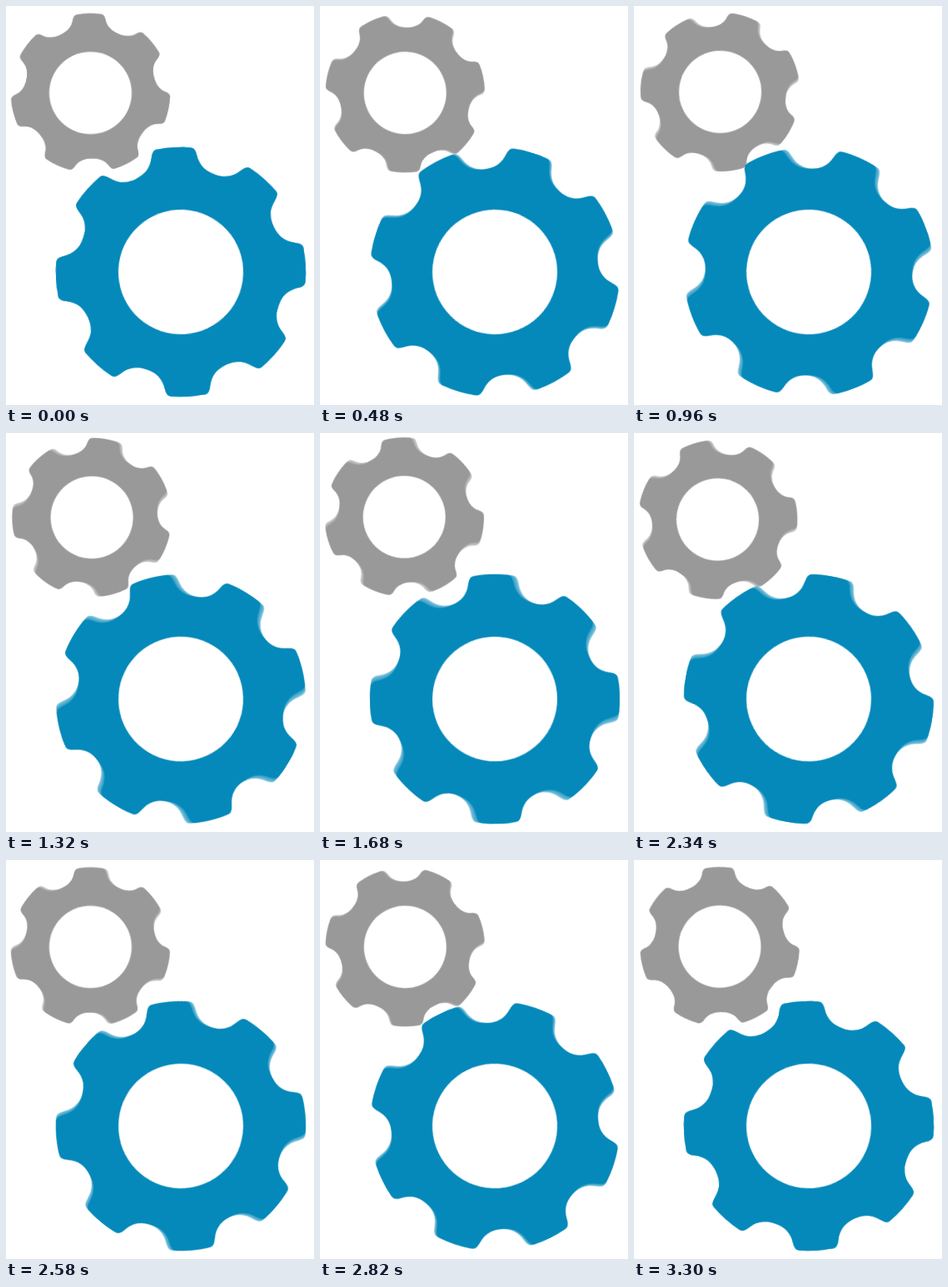
Recreate the animation shown at these times as an HTML page without scripts. Size 370 px wide and 480 px high, loop 3.33 s.

```html
<!DOCTYPE html>
<html lang="en">
<head>
<meta charset="utf-8">
<title>Gears</title>
<style>
  html, body { margin: 0; width: 100%; height: 100%; overflow: hidden; background: #fff; }
  svg { display: block; width: 370px; height: 480px; }

  .large { fill: #0489ba; --from: -3.3deg; --to: 356.7deg; }
  /* 8:7 teeth, so the small gear turns 8/7 as far the other way */
  .small { fill: #999; --from: 0deg; --to: -411.43deg; }

  .spin { animation: spin 3.33s cubic-bezier(.333, 0, .667, 1) infinite; }
  @keyframes spin {
    from { transform: rotate(var(--from)); }
    to { transform: rotate(var(--to)); }
  }

  /* Motion blur: stacked copies fan out in proportion to speed */
  .blur use { animation: smear 3.33s infinite; }
  .blur :nth-child(1) { --k: -1; }
  .blur :nth-child(2) { --k: 1; opacity: .5; }
  .blur :nth-child(3) { --k: -.5; opacity: .3333; }
  .blur :nth-child(4) { --k: .5; opacity: .25; }
  .blur :nth-child(5) { --k: 0; opacity: .2; }
  @keyframes smear {
    0% { transform: rotate(0deg); animation-timing-function: cubic-bezier(.333, .667, .667, 1); }
    50% { transform: rotate(calc(var(--k) * 1.3deg)); animation-timing-function: cubic-bezier(.333, 0, .667, .333); }
    100% { transform: rotate(0deg); }
  }
</style>
</head>
<body>
<svg viewBox="0 0 370 480">
  <defs>
    <path id="largeTooth" d="M0 0L-47.5-114.6C-35.5-119.6-29.4-126.7-27.1-139.4Q-25.5-147.9-20.9-148.5A150 150 0 0 1 20.9-148.5Q25.5-147.9 27.1-139.4C29.4-126.7 35.5-119.6 47.5-114.6Z"/>
    <g id="largePair">
      <use href="#largeTooth"/>
      <use href="#largeTooth" transform="rotate(180)"/>
    </g>
    <g id="largeGear">
      <circle r="123.7"/>
      <use href="#largePair"/>
      <use href="#largePair" transform="rotate(45)"/>
      <use href="#largePair" transform="rotate(90)"/>
      <use href="#largePair" transform="rotate(135)"/>
    </g>

    <path id="smallTooth" d="M0 0L-34.1-70.7C-26-74.6-20.9-80-19.5-87.9Q-18.4-93.7-14.9-94.3A95.5 95.5 0 0 1 14.9-94.3Q18.4-93.7 19.5-87.9C20.9-80 26-74.6 34.1-70.7Z"/>
    <g id="smallGear">
      <circle r="78.3"/>
      <use href="#smallTooth"/>
      <use href="#smallTooth" transform="rotate(51.43)"/>
      <use href="#smallTooth" transform="rotate(102.86)"/>
      <use href="#smallTooth" transform="rotate(154.29)"/>
      <use href="#smallTooth" transform="rotate(205.71)"/>
      <use href="#smallTooth" transform="rotate(257.14)"/>
      <use href="#smallTooth" transform="rotate(308.57)"/>
    </g>
  </defs>

  <!-- The small gear turns about a point slightly off its centre -->
  <g transform="translate(101.8 102.8)">
    <g class="small spin">
      <g transform="translate(-.3 1.8) rotate(-1.1)">
        <g class="blur">
          <use href="#smallGear"/>
          <use href="#smallGear"/>
          <use href="#smallGear"/>
          <use href="#smallGear"/>
          <use href="#smallGear"/>
        </g>
        <circle r="49.5" fill="#fff"/>
      </g>
    </g>
  </g>

  <g transform="translate(210 320)">
    <g class="large spin">
      <g class="blur">
        <use href="#largeGear"/>
        <use href="#largeGear"/>
        <use href="#largeGear"/>
        <use href="#largeGear"/>
        <use href="#largeGear"/>
      </g>
      <circle r="75" fill="#fff"/>
    </g>
  </g>
</svg>
</body>
</html>
```
